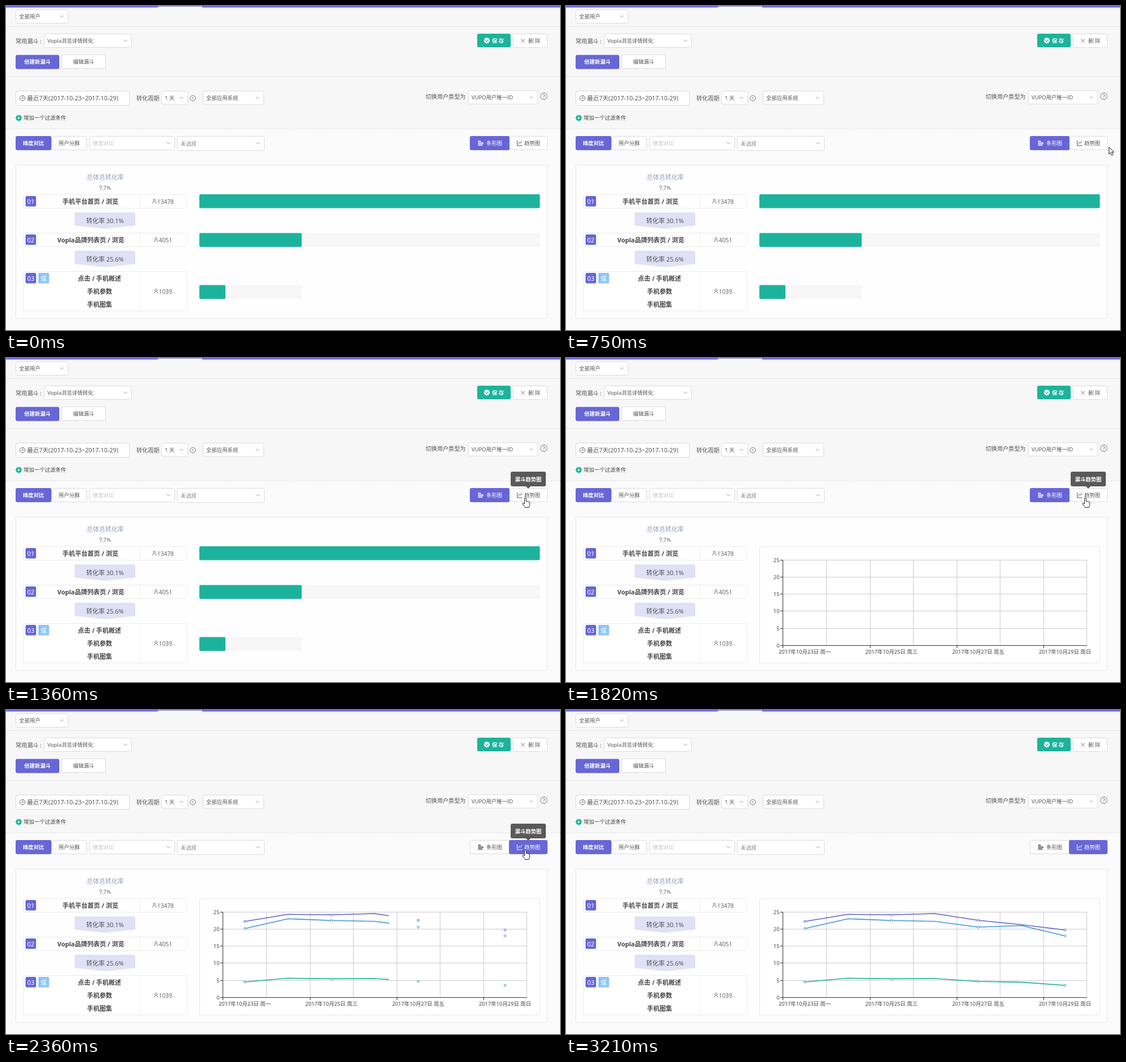
An HTML page for the animation above (3.76 s loop, 977 by 573 pixels).

```html
<!DOCTYPE html>
<html lang="zh">
<head>
<meta charset="utf-8">
<title>Funnel</title>
<style>
html, body { margin: 0; width: 100%; height: 100%; overflow: hidden; background: #fbfbfb; }
svg { display: block; font-family: "Noto Sans", "Noto Sans CJK SC", "Noto Sans CJK", sans-serif; }
</style>
</head>
<body>
<svg id="stage" width="977" height="573" viewBox="0 0 977 573"></svg>
<script>
const LOOP = 3760, STEP = 77, START = 200;
const PURPLE = '#6866d6', GREEN = '#1cb39c', DARK = '#555', BORDER = '#dcdcdc', FAINT = '#ececec';
const BOLD = 'font-weight="600"', MID = 'text-anchor="middle"';

// Markup helpers
const text = (x, y, s, size = 9.4, fill = DARK, extra = '') =>
  `<text x="${x}" y="${y + size * .37}" font-size="${size}" fill="${fill}" ${extra}>${s}</text>`;
const rect = (x, y, w, h, fill, r = 0) =>
  `<rect x="${x}" y="${y}" width="${w}" height="${h}" rx="${r}" fill="${fill}"/>`;
const box = (x, y, w, h, stroke = BORDER, fill = '#fff', r = 3) =>
  `<rect x="${x + .5}" y="${y + .5}" width="${w - 1}" height="${h - 1}" rx="${r}" fill="${fill}" stroke="${stroke}"/>`;
const path = (d, stroke, width = 1, extra = '') =>
  `<path d="${d}" fill="none" stroke="${stroke}" stroke-width="${width}" ${extra}/>`;
const circle = (x, y, r, fill, stroke = 'none') =>
  `<circle cx="${x}" cy="${y}" r="${r}" fill="${fill}" stroke="${stroke}"/>`;
const group = (id, body, extra = '') => `<g id="${id}" ${extra}>${body}</g>`;

const select = (x, y, w, h, label, fill = DARK) =>
  box(x, y, w, h) + text(x + 6, y + h / 2 + .5, label, 9.4, fill) +
  path(`M${x + w - 14.5} ${y + h / 2 - 1.7}l3 3 3-3`, '#999');
const help = (x, y, r) =>
  circle(x, y, r, 'none', '#777') + text(x, y, '?', r * 1.6, '#666', MID);
const button = (x, y, w, label, primary) =>
  (primary ? rect(x, y, w, 25, PURPLE, 3) : box(x, y, w, 25)) +
  text(x + w / 2, y + 12.5, label, 9.4, primary ? '#fff' : DARK, MID + (primary ? ' ' + BOLD : ''));
const person = (x, y) =>
  circle(x, y - 2, 2, 'none', '#777') + path(`M${x - 3.2} ${y + 4}c0-5 6.4-5 6.4 0`, '#777');

function toolbar() {
  return rect(0, 0, 977, 218, '#f7f7f7') +
    rect(0, 2, 977, 2, '#e4e4f2') + rect(0, 0, 977, 2.5, PURPLE) + rect(268, 1, 78, 3, '#fff') +
    path('M0 36.5H977', '#e6e6e6') +
    path('M0 124.5H977M0 217.5H977', '#e2e2e2', 1, 'stroke-dasharray="3 2"') +
    select(17, 6, 93, 25, '全部用户') +
    text(17, 62, '常用漏斗 :', 10.1) + select(67, 49, 155, 25, 'Vopla浏览详情转化') +
    rect(831, 49, 59, 24, GREEN, 3) + circle(848, 61, 5, '#fff') +
    path('M845.5 61l2 2 3.2-3.6', GREEN, 1.3) + text(857, 61.5, '保 存', 9.4, '#fff', BOLD) +
    box(894, 49, 61, 25) + path('M908.5 58.5l6 6m0-6l-6 6', '#666') + text(921, 61.5, '删 除') +
    button(17, 86.5, 77, '创建新漏斗', true) + button(98, 86, 78, '编辑漏斗') +
    box(17, 150, 201, 26) + circle(29, 163, 4.6, 'none', '#666') + path('M29 160v3.3h2.5', '#666') +
    text(37, 163, '最近7天(2017-10-23~2017-10-29)', 10.6) +
    text(230, 163, '转化周期', 10.1) + select(274, 150, 47, 25, '1 天') + help(329.5, 163, 4.8) +
    select(347, 150, 108, 25, '全部应用系统') +
    text(740, 160, '切换用户类型为', 10.1) + select(815, 149, 123, 25, 'VUPO用户唯一ID') + help(948.5, 159.5, 6) +
    circle(22.5, 198, 5.2, GREEN) + path('M20 198h5M22.5 195.5v5', '#fff') +
    text(31, 198, '增加一个过滤条件', 9.4, '#444') +
    button(80, 230, 63, '用户分群') + button(17, 230, 63, '维度对比', true) +
    select(147, 230, 151, 25, '维度对比', '#c4c4c4') + select(302, 230, 154, 26, '未选择', '#888');
}

// View switch: each half has a plain look and an active look on top
function viewSwitch() {
  const bars = c => path('M832.5 239.2h5M832.5 242.5h9.5M832.5 245.8h8', c, 2) + text(847, 243, '条形图', 9.4, c);
  const trend = c => path('M901.5 238v9h9M903.5 244l2-3 2 1.5 2.5-4', c) + text(914, 243, '趋势图', 9.4, c);
  return box(818, 230, 71, 25) + box(887, 230, 68, 25) + bars(DARK) + trend(DARK) +
    group('barTab', rect(818, 230, 70, 25, PURPLE, 3) + bars('#fff')) +
    group('trendTab', rect(887, 230, 68, 25, PURPLE, 3) + trend('#fff'));
}

function funnel() {
  const card = (y, h, no, count, x, ...lines) =>
    box(30, y, 290, h, FAINT) + path(`M237 ${y}v${h}`, FAINT) +
    rect(34.5, y + 3, 18.5, 18.5, PURPLE, 2) + text(43.8, y + 12.5, no, 11, '#fff', MID) +
    lines.map(([cx, s], i) => text(cx, y + 12.5 + 23 * i, s, 11, '#444', MID + ' ' + BOLD)).join('') +
    person(x - 5, y + h / 2) + text(x, y + h / 2 + .5, count, 10.3, '#666');
  const rate = (y, s) =>
    `<path d="M123 ${y}h103q2 0 2 2v21l-53.5 6-53.5-6v-21q0-2 2-2z" fill="#e0e0f6"/>` +
    text(174.5, y + 15, '转化率 ' + s, 10.9, DARK, MID);
  return box(17, 281, 938, 272, '#e6e6e6', '#fefefe', 2) +
    text(175, 303, '总体总转化率', 10.9, '#93a1b8', MID) + text(174.5, 322, '7.7%', 9.4, '#666', MID) +
    card(333, 25, '01', '13478', 266.5, [149, '手机平台首页 / 浏览']) + rate(365, '30.1%') +
    card(401, 25, '02', '4051', 269.5, [149.5, 'Vopla品牌列表页 / 浏览']) + rate(433, '25.6%') +
    card(469, 71, '03', '1039', 269.5, [165, '点击 / 手机概述'], [165, '手机参数'], [165, '手机图集']) +
    rect(57, 472, 19, 18.5, '#8ec5fa', 2) + text(66.5, 481.5, '或', 10.9, '#fff', MID);
}

const barView = () =>
  rect(341, 333, 600.5, 24.5, GREEN, 2) +
  rect(341, 401.5, 600.5, 24.5, '#f7f7f7', 2) + rect(341, 401.5, 180.5, 24.5, GREEN, 2) +
  rect(341, 493.5, 180.5, 24.5, '#f7f7f7', 2) + rect(341, 493.5, 46, 24.5, GREEN, 2);

const series = [
  ['#6260cf', [374, 361.3, 362.3, 360, 372, 379.7, 389]],
  ['#3f95dc', [386.5, 369.2, 372.3, 373.7, 384, 381.3, 399.5]],
  ['#1bb09a', [481, 474.3, 475.4, 475, 480, 481.4, 487]],
];
const dayX = i => 421 + 76.5 * i;

function chartView() {
  let out = box(341, 333, 601, 207, '#e6e6e6', '#fff', 2), lines = '', dots = '';
  for (let i = 0; i < 6; i++) {
    const y = Math.round(508 - 30.3 * i) + .5;
    out += path(`M383 ${y}H919`, '#ccc') + path(`M378 ${y}h5`, '#333') +
      text(376.5, y, 5 * i, 9.4, '#444', 'text-anchor="end"');
  }
  for (let i = 1; i < 8; i++) out += path(`M${Math.floor(383 + 76.5 * i) + .5} 357V508`, '#ccc');
  out += path('M382.5 357V513M382.5 508.5H919M536.5 508v5M689.5 508v5M842.5 508v5', '#333');
  ['23日 周一', '25日 周三', '27日 周五', '29日 周日'].forEach((s, i) =>
    out += text(dayX(2 * i), 519.5, '2017年10月' + s, 9.4, '#444', MID));
  for (const [color, ys] of series) {
    lines += path('M' + ys.map((y, i) => `${dayX(i)} ${y}`).join('L'), color, 1.6, 'stroke-linejoin="round"');
    ys.forEach((y, i) => {
      if (i % 2 == 0) dots += `<g class="dot" data-at="${dayX(i)} ${y}">${circle(0, 0, 1.8, '#fff', color)}</g>`;
    });
  }
  return out + '<clipPath id="reveal"><rect id="wipe" x="383" y="340" width="0" height="180"/></clipPath>' +
    `<g clip-path="url(#reveal)">${lines}</g>` + dots;
}

const tooltip = () =>
  rect(890, 201, 62, 26, '#595959', 3) + '<path d="M917 227h8l-4 4z" fill="#595959"/>' +
  text(921, 214.5, '漏斗趋势图', 9.4, '#fff', MID + ' ' + BOLD);

const INK = 'fill="#fff" stroke="#222" stroke-width="1" stroke-linejoin="round"';
const arrow = `<path ${INK} d="M.5.5V13l2.9-2.7 2 4.6 2.1-.9-2-4.5h4z"/>`;
const hand = `<path ${INK} d="M-1.5 2a1.5 1.5 0 0 1 3 0v5q1.2-1 2.3.2 1.2-.8 2.1.4 1.6-.4 1.6 1.2v4.4L6 17.5H-.5L-4.7 11.2q-.4-1.8 1.2-1.8l2 1.8z"/>`;

const $ = id => document.getElementById(id);
$('stage').innerHTML = toolbar() + viewSwitch() + funnel() + group('bars', barView()) +
  group('chart', chartView()) + group('tip', tooltip()) +
  group('cursor', group('arrow', arrow) + group('hand', hand));
const dots = [...document.querySelectorAll('.dot')];

// Pointer path: time, x, y
const route = [
  [200, 928, 556], [431, 966, 420], [662, 961, 257], [739, 957, 249], [970, 915, 240],
  [1047, 907, 241], [1201, 913, 250], [1278, 916, 247], [2896, 916, 247], [3125, 982, 255],
];
const clamp = v => Math.max(0, Math.min(1, v));
const show = (id, on) => $(id).setAttribute('display', on ? 'inline' : 'none');
const fade = (id, v) => $(id).setAttribute('opacity', v);

function pointerAt(t) {
  const i = Math.max(1, route.findIndex(p => p[0] >= t));
  const [a, b] = [route[i - 1], route[i]], f = clamp((t - a[0]) / (b[0] - a[0]));
  return [a[1] + (b[1] - a[1]) * f, a[2] + (b[2] - a[2]) * f];
}

function draw(time) {
  const t = time < START ? 0 : START + STEP * Math.floor((time - START) / STEP);

  const charted = t >= 1817, active = clamp((t - 1817) / 220);
  show('bars', !charted);
  show('chart', charted);
  fade('barTab', 1 - active);
  fade('trendTab', active);

  $('wipe').setAttribute('width', t < 1890 ? 0 : 536 * clamp((t - 1729) / 1149));
  const scale = clamp((t - 1817) / 500);
  for (const d of dots) d.setAttribute('transform', `translate(${d.dataset.at}) scale(${scale})`);

  fade('tip', Math.min(clamp((t - 1200) / 155), clamp((3202 - t) / 200)));

  const visible = t >= START && t < 3125;
  show('cursor', visible);
  if (visible) {
    const [x, y] = pointerAt(t), over = x > 888 && x < 955 && y > 229 && y < 256;
    $('cursor').setAttribute('transform', `translate(${x} ${y})`);
    show('hand', over);
    show('arrow', !over);
  }
}

const origin = performance.now();
function tick() {
  draw((performance.now() - origin) % LOOP);
  requestAnimationFrame(tick);
}
tick();
</script>
</body>
</html>
```
